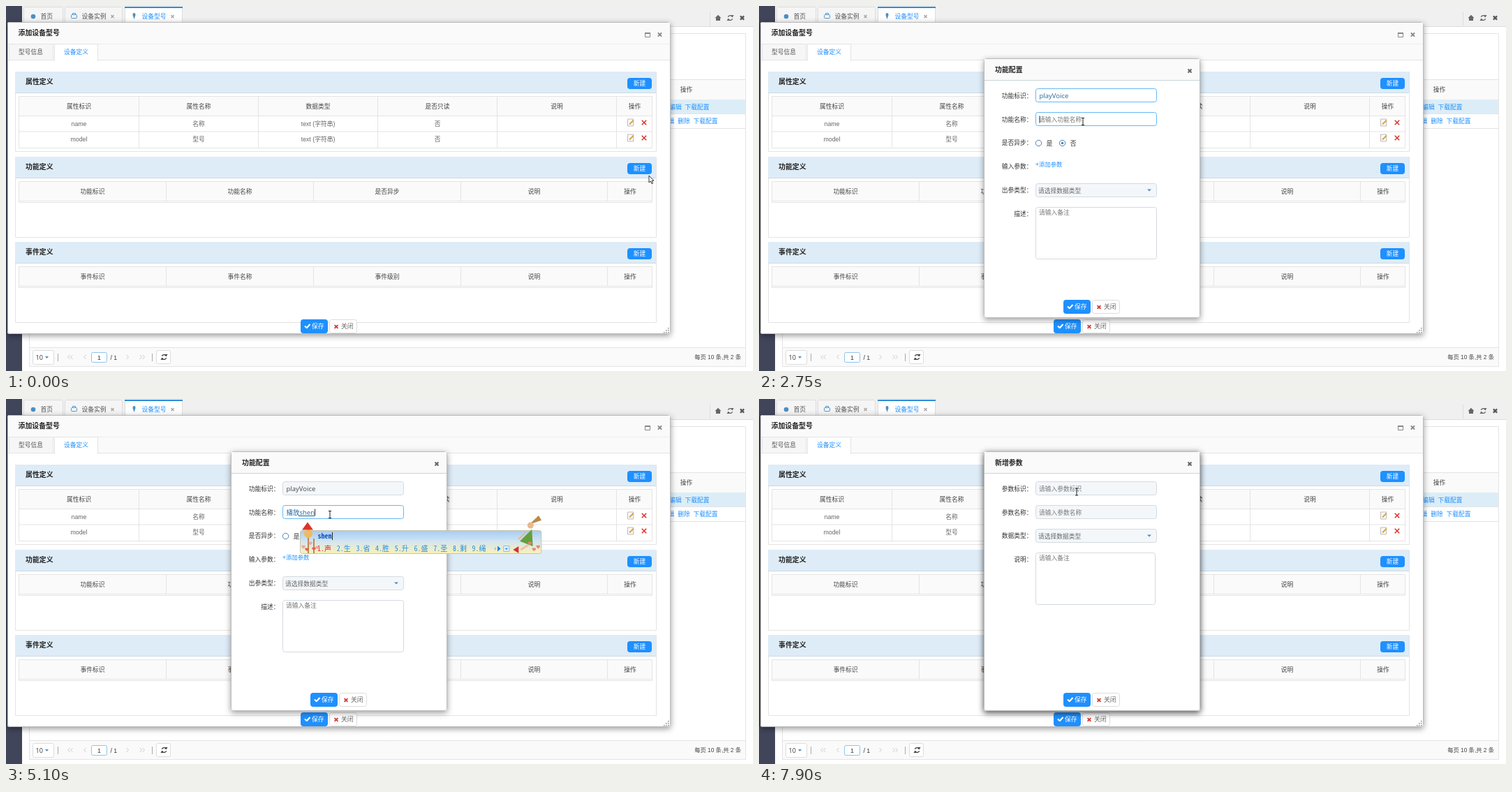
Write an HTML page with a canvas that moves like this. It is 1070x523 px and loops after 8 s.

```html
<!DOCTYPE html>
<html lang="zh">
<meta charset="utf-8">
<style>
html, body { margin: 0; width: 1070px; height: 523px; overflow: hidden; background: #fff; }
canvas { display: block; }
</style>
<canvas id="stage" width="1070" height="523"></canvas>
<script>
const c = document.getElementById('stage').getContext('2d');
const SANS = '"Liberation Sans", "Noto Sans CJK SC", "Noto Sans CJK", sans-serif';
const WIDE = '"Open Sans", "Noto Sans CJK SC", "Noto Sans CJK", sans-serif';
const MONO = '"Noto Sans Mono CJK SC", "Noto Sans CJK SC", "Noto Sans CJK", monospace';
const BLUE = '#1e90ff', LINE = '#e4e4e4', RED = '#e0342b', STEEL = '#4a8fc4';
const DOWN = Math.PI / 2, UP = -DOWN, RIGHT = 0, LEFT = Math.PI;

// ---- drawing helpers ----
function text(s, x, y, color = '#444', { size = 8.75, align = 'left', font = SANS, weight = 400 } = {}) {
  c.font = `${weight} ${size}px ${font}`;
  c.textAlign = align;
  c.fillStyle = color;
  c.fillText(s, x, y + size * .37);
  return c.measureText(s).width;
}
const mid = (s, x, y, color) => text(s, x, y, color, { align: 'center' });
const title = (s, x, y) => text(s, x, y, '#222', { size: 9.9, weight: 700 });

function fill(x, y, w, h, color) {
  c.fillStyle = color;
  c.fillRect(x, y, w, h);
}
function paint(bg, border, width = 1) {
  if (bg) { c.fillStyle = bg; c.fill(); }
  if (border) { c.strokeStyle = border; c.lineWidth = width; c.stroke(); }
}
function box(x, y, w, h, bg, border, radius = 0) {
  const inset = border ? .5 : 0;
  c.beginPath();
  c.roundRect(x + inset, y + inset, w - 2 * inset, h - 2 * inset, radius);
  paint(bg, border);
}
function disc(x, y, r, bg, border) {
  c.beginPath();
  c.arc(x, y, r, 0, 7);
  paint(bg, border);
}
function line(x1, y1, x2, y2, color, width = 1) {
  c.beginPath();
  c.moveTo(x1, y1);
  c.lineTo(x2, y2);
  paint(null, color, width);
}
// Triangle pointing along an angle: half as deep as `depth` on either side of its centre.
function triangle(x, y, depth, half, angle, bg, border) {
  c.save();
  c.translate(x, y);
  c.rotate(angle);
  c.beginPath();
  c.moveTo(-depth / 2, -half);
  c.lineTo(depth / 2, 0);
  c.lineTo(-depth / 2, half);
  c.restore();
  paint(bg, border);
}
function cross(x, y, r, color, width = 1.9) {
  line(x - r, y - r, x + r, y + r, color, width);
  line(x + r, y - r, x - r, y + r, color, width);
}
function refresh(x, y, color) {
  for (const side of [1, -1]) {
    c.beginPath();
    c.arc(x, y, 3.4, side > 0 ? .4 : .4 + Math.PI, side > 0 ? 2.8 : 2.8 + Math.PI);
    paint(null, color, 1.4);
    triangle(x + side * 2.7, y - side * 2.4, 3.2, 2.4, side > 0 ? DOWN : UP, color);
  }
}
function sheet(x, y, w, h) {
  c.save();
  c.shadowColor = 'rgba(0,0,0,.4)';
  c.shadowBlur = 8;
  c.shadowOffsetY = 2.5;
  box(x, y, w, h, '#fff', null, 3);
  c.restore();
  box(x, y, w, h, '#fff', '#bcbcbc', 3);
  fill(x + 1, y + 1, w - 2, 30, '#fafafa');
}
function saveClose(x, y) {
  box(x, y, 39, 20, BLUE, null, 4);
  line(x + 6, y + 9.5, x + 9, y + 12.5, '#fff', 2);
  line(x + 8.5, y + 12.5, x + 13.5, y + 7, '#fff', 2);
  text('保存', x + 16, y + 9.5, '#fff');
  box(x + 41, y, 40, 20, '#fff', '#ddd', 3);
  cross(x + 51, y + 10.5, 2.4, '#d43f3a', 2);
  text('关闭', x + 58, y + 9.5, '#666');
}

// ---- page behind the dialog ----
function tab(x, w, name, active) {
  box(x, 1, w, 30, active ? '#fff' : '#f5f5f5', '#ddd', 2);
  if (active) fill(x, 1, w, 2, '#2d8bd8');
  text(name, x + 24.5, 14.5, active ? BLUE : '#555');
}
function page() {
  fill(0, 0, 1070, 523, '#fff');
  fill(23, 0, 1047, 29, '#f0f0f0');
  fill(23, 29, 1047, 1, '#ddd');
  fill(0, 0, 23, 523, '#41455a');
  tab(25, 57, '首页');
  tab(84, 83, '设备实例');
  tab(170, 83, '设备型号', true);
  disc(39, 15, 3.3, STEEL);
  box(93, 12, 9, 6, '#fff', STEEL, 1);
  box(95, 10, 5, 3, '#fff', STEEL);
  disc(183.5, 12, 2, STEEL);
  triangle(183.5, 16, 6, 2, DOWN, STEEL);
  for (const x of [152.5, 238.5]) cross(x, 15, 2, '#aaa', 1.6);
  fill(1008, 8, 1, 20, '#ddd');
  triangle(1020, 15, 4.5, 4.5, UP, '#666');
  fill(1017, 17, 6, 4, '#666');
  refresh(1037.5, 17, '#666');
  cross(1054.5, 17, 2.6, '#555', 2.2);

  box(33, 39, 1027, 478, '#fff', LINE);
  box(33, 105, 1027, 71, '#fff', LINE);
  fill(34, 106, 1025, 28, '#fafafa');
  fill(34, 134, 1025, 21, '#dcedf7');
  fill(34, 154, 1025, 1, LINE);
  mid('操作', 974.5, 119.5);
  text('编辑  下载配置', 1007.5, 144.5, BLUE, { align: 'right' });
  text('编辑  删除  下载配置', 1019.5, 165, BLUE, { align: 'right' });

  box(33, 489, 1027, 28, '#fafafa', LINE);
  box(38, 493, 31, 21, '#fff', '#ddd', 2);
  text('10', 42.5, 503.5, '#333', { font: WIDE, size: 9 });
  triangle(58.5, 503.5, 3, 2.5, DOWN, STEEL);
  for (const x of [74, 209]) fill(x, 498, 1, 11, '#aaa');
  for (const x of [90, 94, 113]) {
    triangle(x, 503, 3, 3, LEFT, null, '#ccc');
    triangle(287 - x, 503, 3, 3, RIGHT, null, '#ccc');
  }
  box(122, 496, 23, 15, '#fff', '#8cc4ee', 2);
  mid('1', 133.5, 503.5, '#333');
  text('/ 1', 149.5, 503.5, '#333');
  box(215, 493, 21, 20, '#fff', '#ddd', 2);
  refresh(226.5, 503, '#444');
  text('每页 10 条,共 2 条', 1053, 502.5, '#444', { align: 'right', size: 8.3 });
}

// ---- large dialog ----
// Equal columns followed by a narrower one for the actions.
function section(y, h, name, columns, lastEdge, rows = []) {
  const pitch = (lastEdge - 18) / (columns.length - 1);
  const edge = i => i < columns.length ? Math.round(18.4 + i * pitch) : 926;
  const centre = i => (edge(i) + edge(i + 1)) / 2 + .5;
  const tableH = 31 + rows.length * 22;
  box(13, y, 919, h, '#fff', LINE);
  fill(13, y, 918, 30, '#deecf7');
  fill(13, y + 30, 918, 1, '#c9dbe6');
  title(name, 28, y + 14.5);
  box(890, y + 9, 35, 16, BLUE, null, 4);
  mid('新建', 907.5, y + 16.5, '#fff');
  box(18, y + 35, 908, tableH, '#fff', LINE);
  fill(19, y + 36, 906, 27, '#fafafa');
  fill(18, y + 63, 908, 1, LINE);
  columns.forEach((s, i) => {
    mid(s, centre(i), y + 50);
    if (i) fill(edge(i), y + 35, 1, rows.length ? tableH : 29, LINE);
  });
  rows.forEach((row, k) => {
    const ry = y + 74.5 + k * 22;
    if (k) fill(18, ry - 11, 908, 1, LINE);
    row.forEach((s, i) => mid(s, centre(i), ry, '#666'));
    box(890, ry - 7, 9, 11, '#fafafa', '#bbb');
    line(893, ry + 1, 899, ry - 5, '#d9a441', 2);
    cross(914, ry - 1.5, 3.2, RED, 1.6);
  });
}
function dialog() {
  sheet(2, 23, 950, 447);
  title('添加设备型号', 17.5, 38.5);
  box(915, 38, 8, 7, '#fff', '#888');
  fill(915, 38, 8, 2, '#888');
  cross(936.5, 41, 2.6, '#888', 2);
  fill(3, 54, 948, 24, '#fafafa');
  fill(3, 54, 948, 1, '#eee');
  fill(3, 77, 948, 1, LINE);
  box(4, 54, 64, 24, '#f6f6f6', LINE);
  box(69, 54, 63, 25, '#fff', LINE);
  fill(70, 76, 61, 4, '#fff');
  text('型号信息', 18, 66, '#555');
  text('设备定义', 83, 66, BLUE);

  section(94, 115, '属性定义', ['属性标识', '属性名称', '数据类型', '是否只读', '说明', '操作'], 874, [
    ['name', '名称', 'text (字符串)', '否'],
    ['model', '型号', 'text (字符串)', '否']
  ]);
  section(216, 116, '功能定义', ['功能标识', '功能名称', '是否异步', '说明', '操作'], 861);
  section(338, 116, '事件定义', ['事件标识', '事件名称', '事件级别', '说明', '操作'], 861);
  saveClose(422, 449);
  for (let i = 0; i < 3; i++)
    for (let j = 0; j <= i; j++) fill(948 - j * 3, 461 + i * 3, 1.5, 1.5, '#888');
}

// ---- small popup and its fields ----
const rowY = i => 128.5 + i * 33.8;

function popup(name, labels) {
  sheet(322, 75, 310, 372);
  title(name, 338, 91);
  cross(617, 93, 2.5, '#666', 2);
  fill(323, 106, 308, 1, '#ccd3d8');
  saveClose(436, 421);
  labels.forEach((s, i) => text(s + '：', 391.5, rowY(i), '#333', { align: 'right' }));
}
function field(y, value, hint, focused) {
  box(396, y - 10, 174, 20, focused ? '#fff' : '#f4f7fa', focused ? '#62b8f5' : '#d3dae0', 3);
  if (!value) { text(hint, 401, y + .5, '#777'); return 0; }
  return text(value, 401.5, y + .5, focused ? '#23679a' : '#444', { font: WIDE, size: /[a-z]/.test(value) ? 9.5 : 8.9 });
}
function select(y) {
  box(396, y - 10, 174, 20, '#f4f7fa', '#d3dae0', 3);
  text('请选择数据类型', 400, y + .5, '#666');
  triangle(559, y, 3, 3, DOWN, STEEL);
}
function area(y, w) {
  box(396, y, w, 75, '#fff', '#d3dae0', 3);
  text('请输入备注', 401, y + 7.5, '#777');
}
const caret = (x, y) => fill(x, y - 5, 1, 10, '#333');

// ---- input method window ----
function heart(x, y, r, color) {
  for (const side of [-1, 1]) disc(x + side * r / 2, y, r * .6, color);
  triangle(x, y + r * .8, r * 1.3, r, DOWN, color);
}
function inputMethod(x, pinyin, words) {
  const style = { font: MONO, size: 10 }, gap = 7.7;
  c.font = `10px ${MONO}`;
  const items = words.split(' ').map((w, i) => `${i + 1}.${w}`);
  const width = items.reduce((sum, s) => sum + c.measureText(s).width + gap, 97);
  const r = x + width;
  const sky = c.createLinearGradient(0, 188, 0, 222);
  ['#a4cbf7', '#d5e6ee', '#fbf2b4'].forEach((color, i) => sky.addColorStop(i / 2, color));
  box(x, 188, width, 34, sky, '#c9c6a8', 3);

  const typed = text(pinyin, x + 25.5, 196, '#0b4fc0', { ...style, weight: 700 });
  fill(x + 26 + typed, 191, 1, 11, '#222');
  let at = x + 25;
  items.forEach((s, i) => { at += text(s, at, 214.5, i ? '#268ce0' : '#e3202c', style) + gap; });
  triangle(r - 67, 214.5, 3, 3, LEFT, '#a9cdec');
  triangle(r - 61, 214.5, 4.5, 4, RIGHT, '#1684e0');
  box(r - 55, 210, 9, 9, '#e3f1fb', '#8bbfe6');
  triangle(r - 50.5, 215, 2.5, 2, DOWN, '#1684e0');

  // lantern house on the left, girl in green on the right
  fill(x + 11, 196, 2, 25, '#b98a50');
  fill(x + 19, 200, 2, 21, '#b98a50');
  disc(x + 12, 193, 6, '#eebb62');
  triangle(x + 11, 182, 11, 8, UP, '#dc3528');
  triangle(r - 10, 175, 18, 4, 2.6, '#b98a4a');
  disc(r - 16, 181, 4.5, '#e9b98c');
  triangle(r - 18, 197, 22, 10, -1.2, '#669f3a');
  line(r - 23, 191, r - 33, 201, '#e9b98c', 2);
  line(r - 19, 209, r - 30, 216, '#efc39c', 3);
  triangle(r - 37, 216, 8, 5, LEFT, '#d92f35');
  for (let i = 0; i < 5; i++) {
    const y = 211 + 5 * Math.sin(i * 2.3);
    heart(x + 5 + i * 5, y, 2.5, i % 2 ? '#e0605c' : '#f0a3a0');
    if (i < 3) heart(r - 5 - i * 6, y, 2.5, '#e9827f');
  }
}

// Two compositions in turn: text already entered, letters being composed, candidates.
function composition(t) {
  if (t < 3850) return ['', ''];
  if (t < 4000) return ['', 'b', t < 3900 ? '' : '吧 不 把 表 被 班 包 别 呗'];
  if (t < 4250) return ['', "bo'f", '播放 不服 爆发 办法 部分 颁发 不妨 不 把'];
  if (t < 4600) return ['', "bo'fang", '播放 播放器 波方 伯方 播房 博方 薄方 驳方 拨放'];
  if (t < 4800) return ['播放', ''];
  if (t < 5400) return ['播放', 'sheng'.slice(0, 1 + (t - 4800) / 100), '声 生 省 胜 升 盛 圣 剩 绳'];
  if (t < 5800) return ['播放', "sheng'yin", '声音 生音 声因 省音 圣音 升音 胜因 盛音 生殷'];
  return ['播放声音', ''];
}

function functionForm(t) {
  popup('功能配置', ['功能标识', '功能名称', '是否异步', '输入参数', '出参类型', '描述']);
  const letters = Math.max(0, (t - 1850) / 60);
  const first = field(128, 'playVoice'.slice(0, letters), '请输入功能标识', t >= 1850 && t < 2800);
  if (t >= 1850 && t < 2450) caret(402 + first, 128);

  const [done, pinyin, words] = composition(t);
  const focused = t >= 2750;
  const second = field(162, done + pinyin, '请输入功能名称', focused);
  const start = done ? 419 : 401.5;
  if (pinyin) fill(start, 167, 401.5 + second - start, 1, '#23679a');
  const blinkOff = (t >= 3300 && t < 3850) || (t >= 6350 && t < 6850);
  if (focused && !blinkOff) caret(401.5 + second, 162.5);

  ['是', '否'].forEach((s, i) => {
    const x = 400.5 + i * 34;
    disc(x, 196.5, 4.2, '#fff', '#4a82b4');
    if (i) disc(x, 196.5, 1.8, '#4a82b4');
    text(s, x + 11.3, 196.5, '#333');
  });
  text('+添加参数', 396, 226.5, BLUE, { size: 8.4 });
  select(264);
  area(288, 174);
  if (words) inputMethod(done ? 421 : 404, pinyin, words);
}
function parameterForm() {
  popup('新增参数', ['参数标识', '参数名称', '数据类型', '说明']);
  field(128, '', '请输入参数标识');
  field(162, '', '请输入参数名称');
  select(196);
  area(220, 172);
}

// ---- pointer ----
const moves = [
  { from: 0, to: 100, x: 919, y: 242 },
  { from: 200, to: 550, x: 912, y: 234 },
  { from: 1200, to: 1650, x: 411, y: 130 },
  { from: 1800, to: 2100, x: 478, y: 170 },
  { from: 2200, to: 2450, x: 464, y: 165.5 },
  { from: 6300, to: 6500, x: 391, y: 258 },
  { from: 6600, to: 7100, x: 415, y: 219 },
  { from: 7600, to: 7900, x: 455, y: 133 }
];
function pointer(t) {
  let x = 921, y = 243;
  for (const m of moves) {
    const k = Math.min(1, Math.max(0, (t - m.from) / (m.to - m.from)));
    x += (m.x - x) * k;
    y += (m.y - y) * k;
  }
  const within = (left, top, right, bottom) => t >= 950 && x >= left && x <= right && y >= top && y <= bottom;
  if (within(396, 118, 570, 138) || within(396, 152, 570, 172)) {
    line(x, y - 5, x, y + 5, '#222');
    for (const end of [-5, 5]) line(x - 2, y + end, x + 2, y + end, '#222');
  } else if (within(396, 216, 434, 232)) {
    box(x - 3, y + 4, 8, 7, '#fff', '#222', 2);
    box(x - 1, y, 3, 7, '#fff', '#222', 1);
  } else {
    c.beginPath();
    [[0, 0], [0, 10], [2.3, 8], [4, 11.7], [5.6, 11], [4, 7.4], [7, 7.2]].forEach(([dx, dy]) => c.lineTo(x + dx, y + dy));
    c.closePath();
    paint('#fff', '#222', .9);
  }
}

function draw(now) {
  const t = Math.floor(now % 8000 / 50) * 50;
  page();
  dialog();
  if (t >= 950) functionForm(t);
  if (t >= 7300) {
    c.globalAlpha = t < 7400 ? .8 : 1;
    parameterForm();
    c.globalAlpha = 1;
  }
  pointer(t);
  requestAnimationFrame(draw);
}
requestAnimationFrame(draw);
</script>
</html>
```
